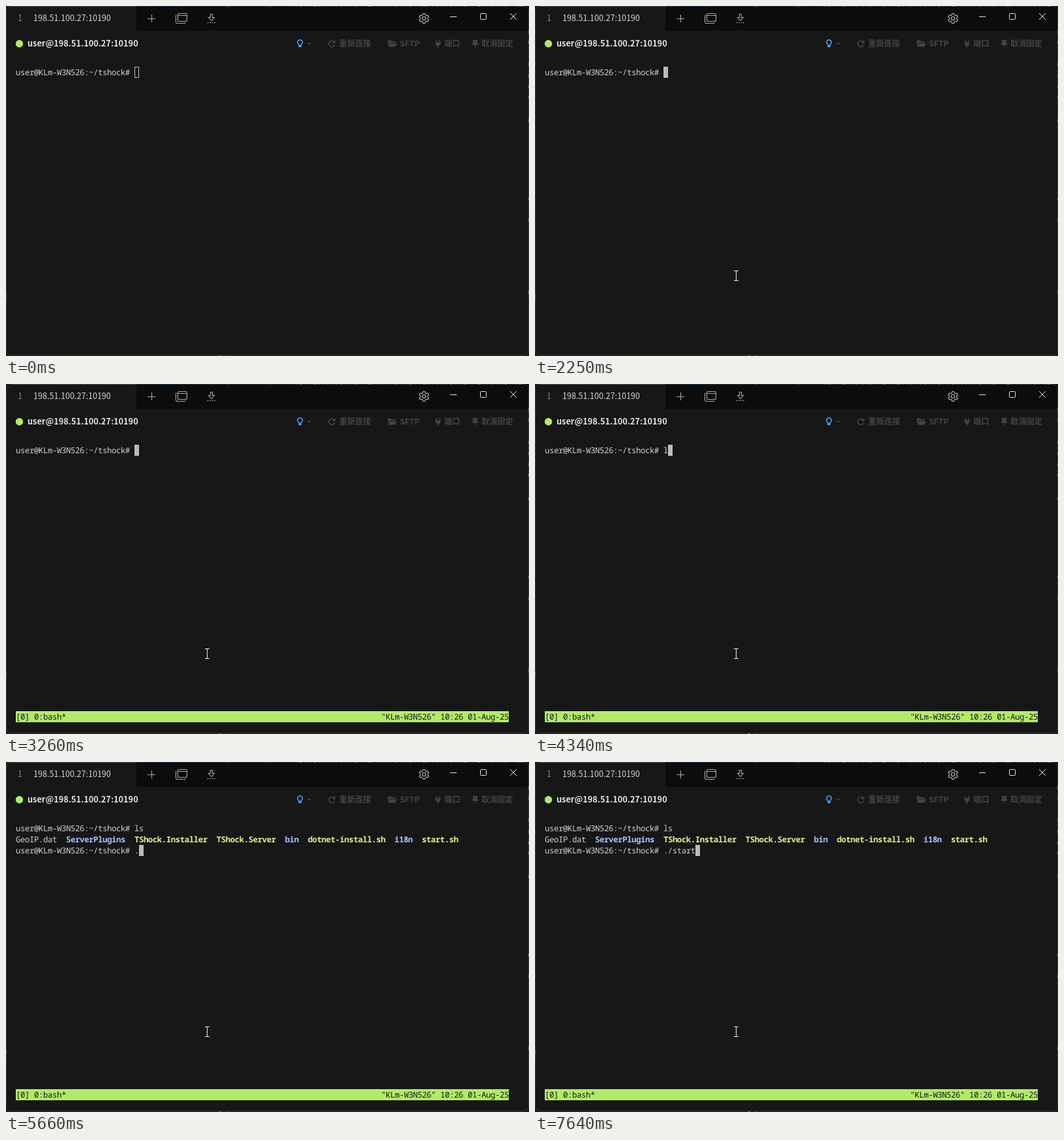
These frames come from a looping animation (802 by 536 pixels, 8 s). An HTML page:

```html
<!DOCTYPE html>
<html lang="zh">
<head>
<meta charset="utf-8">
<title>Terminal session</title>
<style>
html, body { margin: 0; width: 100%; height: 100%; overflow: hidden; background: #171717; }
#stage { position: absolute; left: 0; top: 0; width: 802px; height: 536px; overflow: hidden; background: #171717; }
#stage svg { position: absolute; left: 0; top: 0; }
.ui { position: absolute; white-space: pre; line-height: 20px; font-family: "Noto Sans CJK SC", "Noto Sans", sans-serif; }
.tab { font-size: 12.6px; color: #d8d8d8; top: 8px; }
.title { font-size: 12.75px; font-weight: 700; color: #e4e4e4; top: 47px; }
.btn { font-size: 12.2px; font-weight: 700; color: #444; top: 47px; }
.row { position: absolute; left: 15px; height: 17px; white-space: pre; color: #d2d2d2;
  font: 500 12.4px/17px "Noto Sans Mono", "DejaVu Sans Mono", monospace;
  letter-spacing: -.44px; text-rendering: geometricPrecision; }
.row b { font-weight: 700; }
.dir { color: #a9c5fd; }
.exe { color: #dcf888; }
#status { top: 501px; width: 756px; background: #b1eb68; color: #171717; }
#status span { position: absolute; right: 0; }
#cursor { position: absolute; width: 7px; height: 17px; box-sizing: border-box; border: 1px solid #bcbcbc; }
</style>
</head>
<body>
<div id="stage">
  <svg width="802" height="536" fill="none">
    <rect width="802" height="38" fill="#0c0c0c"/>
    <rect width="200" height="39" fill="#171717"/>
    <rect x=".5" y=".5" width="801" height="534" rx="7" stroke="#34343a"/>
    <path d="M7 .5H200" stroke="#505054"/>
    <path d="M0 535.5H802" stroke="#1b1519"/>
    <g id="specks"></g>

    <g stroke="#a9a9a9" stroke-width="1.1">
      <path d="M217 19.5H229M223.500 13V25"/>
      <rect x="263.500" y="11.500" width="14" height="12" rx="2"/>
      <path d="M263.500 14.500H277.500M261.500 13.500Q260.500 14 260.500 15.500V24Q260.500 26.500 263 26.500H273Q275 26.500 275.500 25.500"/>
      <path d="M313.500 12.500H316.500V17.500H319.500L315 22.500L310.500 17.500H313.500Z"/>
      <path d="M308.500 25.500H322" stroke-dasharray="2 1.500"/>
      <path id="gear" stroke="#b8b8b8" stroke-linejoin="round"/>
      <circle cx="641" cy="19" r="2.700" stroke="#b8b8b8"/>
    </g>
    <g stroke="#e8e8e8">
      <path d="M681 16.500H691"/>
      <rect x="727.500" y="11.500" width="9" height="9" rx="1"/>
      <path d="M773 11L783 21M783 11L773 21"/>
    </g>

    <circle cx="20.500" cy="57.700" r="5.700" fill="#b1eb68"/>
    <g stroke="#58a8f5" stroke-width="1.500">
      <path d="M449.300 59.500C447.800 58 447 57 447 55.700A3.800 3.800 0 0 1 454.600 55.700C454.600 57 453.800 58 452.300 59.500V62.300H449.300Z"/>
      <path d="M449 60.500H453"/>
    </g>
    <path d="M462 56.500H468L465 59.500Z" fill="#444"/>
    <path d="M503.300 55A4.600 4.600 0 1 0 504 59.500" stroke="#444" stroke-width="1.700"/>
    <path d="M505 52V57H500Z" fill="#444"/>
    <g fill="#444">
      <path d="M585.500 61V53.500Q585.500 52.500 586.500 52.500H590L591.500 54H596Q597 54 597 55V56H589Q588 56 587.500 57Z"/>
      <path d="M588.500 57H599.500L597 62Q596.700 62.500 596 62.500H585.800Z"/>
      <path d="M659.500 52H661V55H659.500ZM664 52H665.500V55H664ZM658 55.500H667V57H666.300Q666 60.500 663.300 61.300V64H661.700V61.300Q659 60.500 658.700 57H658Z"/>
      <path d="M715.500 52H723.500V53.500H722.500L723 56.500Q724.500 57.500 724.500 59.500H720.200V62.500L719.500 64L718.800 62.500V59.500H714.500Q714.500 57.500 716 56.500L716.500 53.500H715.500Z"/>
    </g>
  </svg>

  <span class="ui tab" style="left:18px;color:#858585">1</span>
  <span class="ui tab" style="left:42px">198.51.100.27:10190</span>
  <span class="ui title" style="left:33px">user@198.51.100.27:10190</span>
  <span class="ui btn" style="left:511px">重新连接</span>
  <span class="ui btn" style="left:604px">SFTP</span>
  <span class="ui btn" style="left:672px">端口</span>
  <span class="ui btn" style="left:729px">取消固定</span>

  <div class="row" id="line0" style="top:93px"></div>
  <div class="row" id="line1" style="top:110px"></div>
  <div class="row" id="line2" style="top:127px"></div>
  <div class="row" id="status">[0] 0:bash*<span>"KLm-W3N526" 10:26 01-Aug-25</span></div>
  <div id="cursor"></div>

  <svg id="pointer" width="9" height="18" fill="none">
    <path d="M1 .500H8M4.500 1V15M1 15.500H8" stroke="#f2f2f2"/>
  </svg>
</div>
<script>
const LOOP = 8000;
const PROMPT = "user@KLm-W3N526:~/tshock# ";
const COL = 7, ROW = 17, LEFT = 15, TOP = 93;
const FOCUS = 320, MUX = 3260, LIST = 5120;

const $ = id => document.getElementById(id);
const lines = [0, 1, 2].map(i => $("line" + i));

const listing = "GeoIP.dat  " + [
  ["dir", "ServerPlugins"], ["exe", "TShock.Installer"], ["exe", "TShock.Server"],
  ["dir", "bin"], ["exe", "dotnet-install.sh"], ["dir", "i18n"], ["exe", "start.sh"]
].map(([kind, name]) => `<b class="${kind}">${name}</b>`).join("  ");

// Each entry: time, command typed so far
const keys = [
  [0, ""], [1800, "t"], [2250, ""], [2540, "t"], [2700, "tm"], [2900, "tmu"], [3060, "tmux"],
  [MUX, ""], [4340, "l"], [4960, "ls"],
  [LIST, ""], [5660, "."], [5910, "./"], [6410, "./s"], [6990, "./st"],
  [7190, "./sta"], [7350, "./star"], [7640, "./start"]
];
const moves = [80, 120, 160, 200, 250, FOCUS, 520];

function gearPath(cx, cy, teeth) {
  const pts = [];
  for (let i = 0; i < teeth; i++)
    for (const [off, r] of [[-.3, 5.8], [-.19, 7.7], [.19, 7.7], [.3, 5.8]]) {
      const a = (i + off) / teeth * 2 * Math.PI;
      pts.push((cx + r * Math.sin(a)).toFixed(2) + " " + (cy - r * Math.cos(a)).toFixed(2));
    }
  return "M" + pts.join("L") + "Z";
}

// Bits of the desktop showing at the window edges
function edgeSpecks() {
  const rect = (x, y, w, h, c) => `<rect x="${x}" y="${y}" width="${w}" height="${h}" fill="${c}"/>`;
  let out = rect(0, 441, 1, 8, "#55703f") + rect(0, 451, 1, 4, "#2d5a72")
    + rect(222, 0, 40, 1, "#20394f") + rect(339, 0, 1, 2, "#55555a") + rect(404, 0, 1, 2, "#55555a")
    + rect(327, 535, 3, 1, "#77777a") + rect(338, 535, 2, 1, "#55555a");
  for (let x = 443; x < 795; x += 7) out += rect(x, 0, 2 + x % 4, 1, x % 3 ? "#4b4b50" : "#777779");
  for (const y of [37, 53, 87, 104, 121, 137, 173, 293, 326, 436]) out += rect(801, y, 1, 5, "#77777a");
  return out;
}

function place(el, x, y) {
  el.style.left = x + "px";
  el.style.top = y + "px";
}

function setHtml(el, html) {
  if (el.shown !== html) el.innerHTML = el.shown = html;
}

function draw(t) {
  const typed = keys.filter(k => k[0] <= t).pop()[1];
  const entering = t >= 3220 && t < MUX;
  const listed = t >= LIST;
  const row = listed ? 2 : entering ? 1 : 0;

  setHtml(lines[0], PROMPT + (listed ? "ls" : typed));
  setHtml(lines[1], listed ? listing : "");
  setHtml(lines[2], listed ? PROMPT + typed : "");
  $("status").hidden = t < MUX;

  const cursor = $("cursor");
  const col = entering ? 0 : PROMPT.length + typed.length;
  place(cursor, LEFT + col * COL, TOP + row * ROW);
  cursor.style.background = t < FOCUS ? "none" : "#bcbcbc";
  cursor.hidden = t >= 930 && t < 1510;

  const step = moves.filter(m => m <= t).length;
  const left = (1 - step / moves.length) ** 2;
  const pointer = $("pointer");
  pointer.style.display = step ? "block" : "none";
  place(pointer, Math.round(304 - 5 * left), Math.round(405 + 160 * left));
}

$("gear").setAttribute("d", gearPath(641, 19, 6));
$("specks").innerHTML = edgeSpecks();

const start = performance.now();
function tick() {
  draw((performance.now() - start) % LOOP);
  requestAnimationFrame(tick);
}
tick();
</script>
</body>
</html>
```
